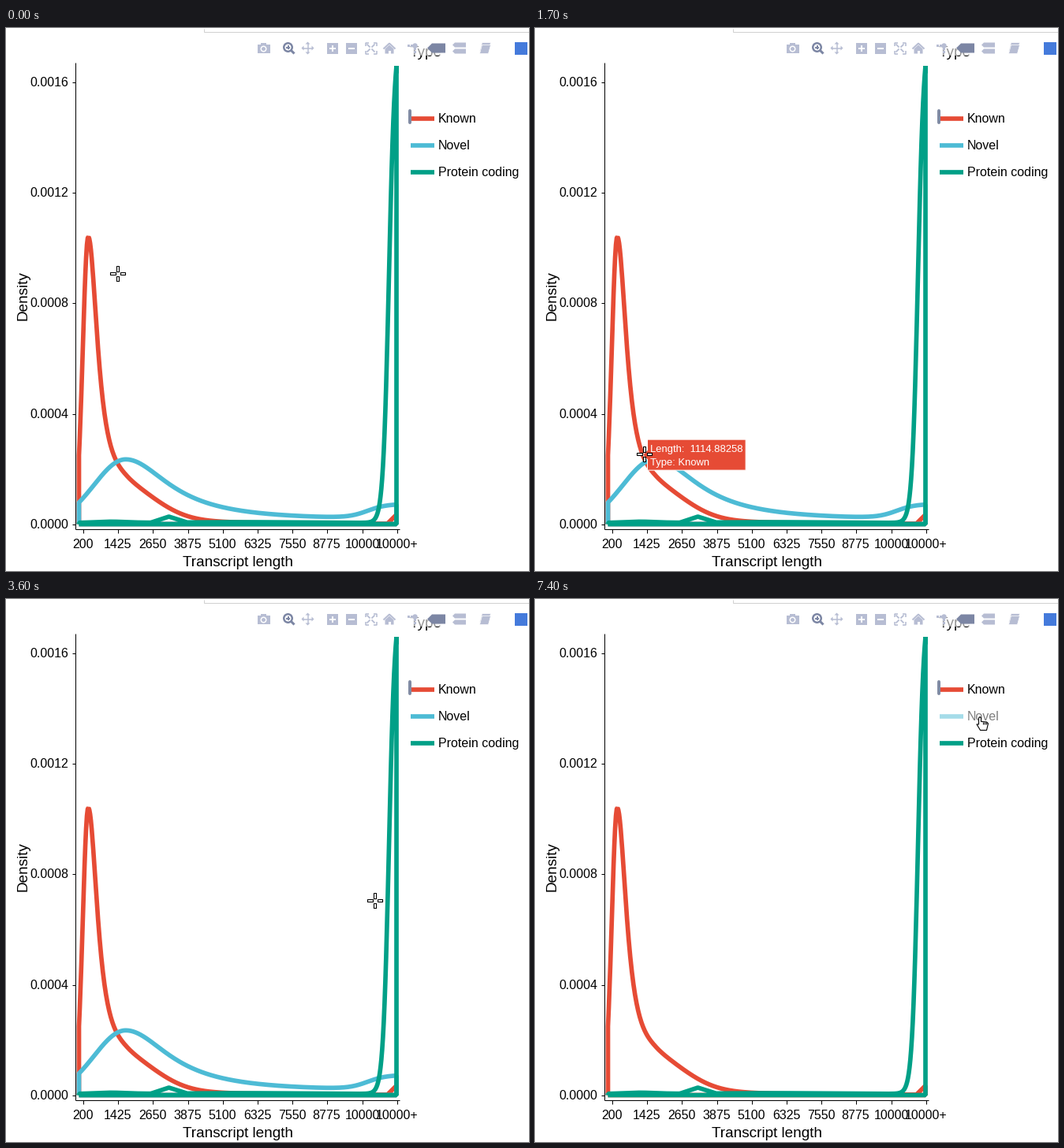
A matplotlib script that plays this animation: 663x689 px, repeating every 8000 ms.

```python
import numpy as np
import matplotlib.pyplot as plt
from matplotlib.animation import FuncAnimation
from matplotlib.patches import Circle, Polygon, Rectangle

W, H, DPI = 663, 689, 100
STEP, LOOP = 100, 8000
LEFT, RIGHT, BASE = 92, 494.5, 629
RED, BLUE, GREEN = "#E64B35", "#4DBBD5", "#00A087"
ICON, ACTIVE = "#B7BDD3", "#7C86A4"

plt.rcParams["font.family"] = "Liberation Sans"
plt.rcParams["toolbar"] = "None"

fig = plt.figure(figsize=(W / DPI, H / DPI), dpi=DPI, facecolor="white")
ax = fig.add_axes([0, 0, 1, 1])
ax.set(xlim=(-0.5, W - 0.5), ylim=(H - 0.5, -0.5))  # whole numbers are pixel centres
ax.axis("off")


def pt(px):
    return px * 72 / DPI


def line(x, y, color="black", width=1, z=1, cap="butt"):
    return ax.plot(x, y, color=color, lw=pt(width), zorder=z,
                   solid_joinstyle="bevel", solid_capstyle=cap)[0]


def text(x, y, s, size=16, z=4, **kw):
    return ax.text(x, y, s, fontsize=pt(size), zorder=z, va="baseline", **kw)


def box(cx, cy, w, h, color=ICON, z=7, **kw):
    ax.add_patch(Rectangle((cx - w / 2, cy - h / 2), w, h, fc=color, lw=0,
                           zorder=z, **kw))


def dot(x, y, r, color=ICON):
    ax.add_patch(Circle((x, y), r, fc=color, lw=0, zorder=7))


def poly(pts, color=ICON, z=7, edge="none", width=0):
    return ax.add_patch(Polygon(pts, closed=True, fc=color, ec=edge,
                                lw=pt(width), zorder=z, joinstyle="round"))


# Density curves: heights in pixels above the base line
def bell(x, mid, left, right):
    return np.exp(-((x - mid) / np.where(x < mid, left, right)) ** 2 / 2)


def peak(x, mid, left, right):
    """Gaussian rise, slow Lorentzian fall."""
    return np.where(x < mid, bell(x, mid, left, left),
                    1 / (1 + ((x - mid) / right) ** 2))


def sigmoid(x, mid, width):
    return 1 / (1 + np.exp((mid - x) / width))


def known(x):
    return (360 * peak(x, 103.7, 6.9, 15) + 30.5 * bell(x, 154, 26, 40)
            + np.maximum(0, x - 483))


def novel(x):
    return (81.5 * peak(x, 151, 40, 69) + 0.011 * (x - LEFT)
            + 18 * sigmoid(x, 458, 12))


def coding(x):
    return (1.5 + 1.5 * bell(x, 132, 20, 20) + bell(x, 300, 80, 80)
            + 7.5 * np.maximum(0, 1 - abs(x - 206) / 23)
            + 623 * sigmoid(x, 484.9, 3.7))


xs = np.linspace(LEFT, RIGHT, 400)
series = {}
for i, (name, f, color) in enumerate([("Known", known, RED), ("Novel", novel, BLUE),
                                      ("Protein coding", coding, GREEN)]):
    y = 114 + 34 * i
    curve = line(np.r_[LEFT, xs, RIGHT, LEFT], np.r_[BASE, BASE - f(xs), BASE, BASE],
                 color, 5.67, 2 + i / 10)
    series[name] = curve, line([512, 542], [y, y], color, 5.67, 2), text(547, y + 5.5, name)
line([511, 511], [104, 119], "#808BA4", 4, 5, "round")

# Axes
line([87, 87], [43, 635])
line([87, 498], [635, 635])
for i in range(5):
    y = round(BASE - 140.25 * i)
    line([83, 87], [y, y])
    text(79, y + 5.5, f"{4 * i / 1e4:.4f}", ha="right")
for i in range(10):
    x = round(97 + 44.2 * i)
    line([x, x], [635, 640])
    label = str(200 + 1225 * i) if i < 8 else ("10000", "10000+")[i - 8]
    text(x, 660, label, ha="center")
text(293, 682.5, "Transcript length", 19, ha="center")
text(25.5, 339, "Density", 19, ha="center", rotation=90, rotation_mode="anchor")

# Panel edge, legend title and toolbar
line([250, 250, W], [0, 4, 4], "#D0D0D0")
text(511, 36, "Type", 19)
box(487, 24, 353, 21, "white", 6, alpha=0.6)


def toolbar(mid=25):
    # camera
    box(326, mid + 1, 16, 11.5)
    box(326, mid - 5, 7, 3)
    dot(326, mid + 1, 4, "white")
    dot(326, mid + 1, 2.5)
    # zoom
    dot(357, mid - 1, 6.5, ACTIVE)
    dot(357, mid - 1, 4, "white")
    line([361, 365], [mid + 3, mid + 7], ACTIVE, 3, 7)
    for w, h in [(5, 2), (2, 5)]:
        box(357, mid - 1, w, h, ACTIVE)
    # pan
    for dx, dy in [(1, 0), (-1, 0), (0, 1), (0, -1)]:
        along, across = np.array([dx, dy]), np.array([dy, dx])
        poly([382, mid] + np.array([8 * along, 5 * along + 3 * across,
                                    5 * along - 3 * across]))
        line([382, 382 + 6 * dx], [mid, mid + 6 * dy], ICON, 1.5, 7)
    # zoom in and out
    for x in (413, 437):
        box(x, mid, 14, 14)
        box(x, mid, 8, 2, "white")
    box(413, mid, 2, 8, "white")
    # autoscale
    for sx in (-1, 1):
        for sy in (-1, 1):
            x, y = 462 + sx * np.array([1, 3, 5, 7]), mid + sy * np.array([1, 3, 5, 7])
            line([x[1], x[3], x[3]], [y[3], y[3], y[1]], ICON, 1.6, 7)
            line([x[0], x[2]], [y[0], y[2]], ICON, 1.8, 7)
    # home
    line([478, 485.5, 493], [mid + 1, mid - 6, mid + 1], ICON, 2, 7)
    poly([(480, mid + 1), (485.5, mid - 4), (491, mid + 1), (491, mid + 7), (480, mid + 7)])
    box(485.5, mid + 5, 3, 4, "white")
    # spike lines
    dot(518, mid - 3, 3.2)
    for d in (4, 8):
        box(518 - d, mid - 3, 2.4, 2.4)
        box(518, mid - 3 + d, 2.4, 2.4)
    # hover modes
    for x, y, w, h, color in [(545, mid, 23, 12, ACTIVE), (574, mid - 4, 17, 6, ICON),
                              (574, mid + 4, 17, 6, ICON)]:
        l, r, t, b = x - w / 2, x + w / 2, y - h / 2, y + h / 2
        poly([(l, y), (l + h / 2, t), (r, t), (r, b), (l + h / 2, b)], color)
    # book
    for dy in (0, 3):
        poly([(603, mid - 7 + dy), (614, mid - 7 + dy), (611, mid + 4 + dy),
              (600, mid + 4 + dy)], ICON, 7, "white", 0.7)
    box(652, mid, 16, 16, "#447ADB")


toolbar()

# Hover label
tip_box = poly([(0, 0)] * 7, RED, 9, "white", 1)
tip_text = [text(0, 0, "", 13, 10, color="white") for _ in range(2)]

# Pointers, outlined around the hot spot
arm = np.array([(-1.5, -9.5), (1.5, -9.5), (1.5, -3), (-1.5, -3)])
shapes = {
    "cross": [arm, -arm, arm[:, ::-1], -arm[:, ::-1]],
    "hand": [np.array([(-5, -7), (-3.5, -8.5), (-2, -7), (-2, -2.5), (5, -2), (7, 0),
                       (5, 8.5), (-3, 8.5), (-7.5, 1), (-5, 1)])]
            + [np.array([(x, -1.8), (x, 1.2)]) for x in (0, 2.4, 4.8)],
    "arrow": [np.array([(0, 0), (0, 15), (3.5, 12), (6, 17.5), (8.3, 16.5),
                        (6, 11), (10.5, 11)])],
}
pointers = {kind: [(poly(s, "white", 12, "black", 1.1), s) for s in parts]
            for kind, parts in shapes.items()}

START = np.array([141.0, 311.0])
MOVES = [  # start, end, target x, target y
    (100, 600, 112, 320), (600, 800, 113, 353), (800, 1000, 109, 378),
    (1000, 1700, 138, 540), (1700, 1900, 139, 549), (1900, 2600, 115, 618),
    (2600, 2700, 131, 622), (2700, 2800, 128, 622), (3100, 3300, 190, 641),
    (3300, 3800, 652, 210), (3800, 4000, 600, 111), (4100, 4400, 577, 123),
    (6000, 6300, 572, 149), (6500, 6600, 567, 163), (6600, 6700, 567, 157.5)]
GAP, X0 = 1.6, 112  # sample spacing on the curves and first sample


def cursor(t):
    pos = START
    for t0, t1, x, y in MOVES:
        pos = pos + (np.array([x, y]) - pos) * np.clip((t - t0) / (t1 - t0), 0, 1)
    return pos


def hovered(t):
    """Name, colour, curve and rough x of the hovered point, if any."""
    if 600 <= t <= 1900:
        fall = np.linspace(105, 160, 300)
        return "Known", RED, known, np.interp(cursor(t)[1], BASE - known(fall), fall)
    if 2600 <= t < 3200:
        return "Protein coding", GREEN, coding, cursor(t - STEP)[0] + X0 - 110.4
    return None


def draw_tip(t):
    hit = hovered(t)
    for a in (tip_box, *tip_text):
        a.set_visible(hit is not None)
    if hit is None:
        return
    name, color, f, near = hit
    k = round((near - X0) / GAP)
    x = X0 + GAP * k
    y = BASE - float(f(x))
    mid = min(y, 615)
    left, top, bottom = x + 6, mid - 19.5, mid + 19.5
    length = 531.61448 + 38.88454 * k
    rows = [f"Length: {length:11.5f}", f"Type: {name}"]
    for i, (a, s) in enumerate(zip(tip_text, rows)):
        a.set_text(s)
        a.set_position((left + 3, top + 16 + 17 * i))
    right = left + 7 + max(a.get_window_extent().width for a in tip_text)
    tip_box.set_xy([(x, y), (left, mid - 6), (left, top), (right, top),
                    (right, bottom), (left, bottom), (left, mid + 6)])
    tip_box.set_facecolor(color)


def draw_cursor(t):
    pos = cursor(t)
    x, y = pos
    if 507 < x < 656 and 98 < y < 196:
        kind = "hand"
    elif x > 498 or y > 636:
        kind = "arrow"
    else:
        kind = "cross"
    for name, parts in pointers.items():
        for patch, shape in parts:
            patch.set_visible(name == kind)
            patch.set_xy(shape + pos)


def update(i):
    t = i * STEP
    hidden = {"Known": 5000 <= t < 5800, "Novel": t >= 7300}
    for name, (curve, key, label) in series.items():
        off = hidden.get(name, False)
        curve.set_visible(not off)
        for a in (key, label):
            a.set_alpha(0.5 if off else 1)
    draw_tip(t)
    draw_cursor(t)
    return []


anim = FuncAnimation(fig, update, frames=LOOP // STEP, interval=STEP,
                     repeat=True, repeat_delay=0, blit=False)
plt.show()
```
